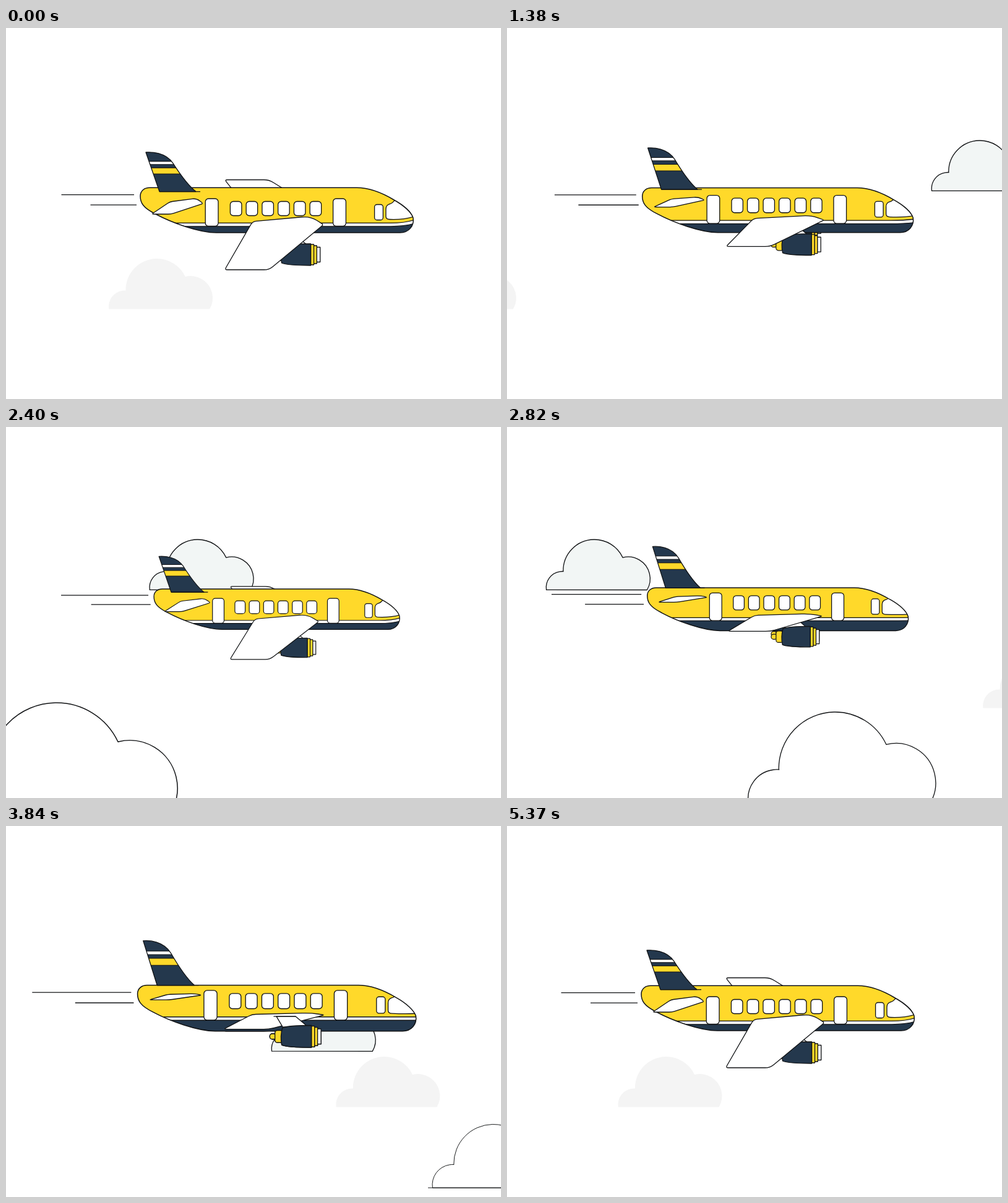
Recreate the animation shown at these times as an HTML page with a canvas. Size 800 by 600 pixels, loop 5.4 s.

```html
<!DOCTYPE html>
<html lang="en">
<head>
<meta charset="utf-8">
<title>Plane in flight</title>
<style>
  html, body { margin: 0; width: 100%; height: 100%; overflow: hidden; background: #fff; }
  canvas { display: block; width: 800px; height: 600px; }
</style>
</head>
<body>
<canvas id="stage" width="800" height="600"></canvas>
<script>
const ctx = document.getElementById('stage').getContext('2d');
const LOOP = 5400, STEP = 30;
const INK = '#101214', YELLOW = '#ffd92a', NAVY = '#24384d', WHITE = '#fff';
const CX = 437.5, CY = 295;

// Smooth monotone curve through [time, value] keys, flat at every turning point.
function curve(keys) {
  const n = keys.length;
  const slope = i => (keys[i + 1][1] - keys[i][1]) / (keys[i + 1][0] - keys[i][0]);
  const tan = keys.map((_, i) => {
    if (i === 0 || i === n - 1) return 0;
    const a = slope(i - 1), b = slope(i);
    return a * b <= 0 ? 0 : 2 * a * b / (a + b);
  });
  return t => {
    let i = 0;
    while (i < n - 2 && t > keys[i + 1][0]) i++;
    const [t0, v0] = keys[i], [t1, v1] = keys[i + 1];
    const h = t1 - t0, u = Math.min(1, Math.max(0, (t - t0) / h)), q = 1 - u;
    return v0 * (1 + 2 * u) * q * q + h * tan[i] * u * q * q +
           v1 * u * u * (3 - 2 * u) - h * tan[i + 1] * u * u * q;
  };
}

// Height of the near wing tip under the axis drives the roll.
const wingDrop = curve([[0, 96], [585, 43], [900, 66], [1200, 96], [1800, -76], [2430, 91],
  [3210, -17], [3700, 31], [4560, 39], [5145, 73], [5370, 96], [5400, 96]]);
const zoom = curve([[0, 1], [1200, 1], [1800, .95], [2400, .9], [3210, 1.02],
  [3600, 1.038], [4100, 1], [5400, 1]]);
const trailA = curve([[0, 117.5], [400, 142], [900, 131], [1800, 136.8], [2400, 156.7],
  [3210, 147.5], [4500, 167], [5130, 161], [5370, 119.5], [5400, 117.5]]);
const trailB = curve([[0, 74.5], [900, 89.5], [1800, 103.7], [2400, 106.7], [3210, 92.6],
  [4560, 93], [5370, 76], [5400, 74.5]]);
const paleX = curve([[500, 1090], [1130, 800], [1800, 497], [2400, 232], [3210, -87], [3700, -270]]);

function paint(fill, width = 1.3) {
  if (fill) { ctx.fillStyle = fill; ctx.fill(); }
  if (width) { ctx.lineWidth = width; ctx.strokeStyle = INK; ctx.stroke(); }
}

function line(x1, y1, x2, y2, width = 1.3) {
  ctx.beginPath();
  ctx.moveTo(x1, y1);
  ctx.lineTo(x2, y2);
  paint(null, width);
}

function box(x, y, w, h, r, fill) {
  ctx.beginPath();
  ctx.roundRect(x, y, w, h, r);
  paint(fill);
}

// Polygon of [x, y, cut]; each corner is softened over the length of its cut.
function softPoly(pts, fill) {
  const n = pts.length;
  const toward = (p, q) => {
    const d = Math.hypot(q[0] - p[0], q[1] - p[1]) || 1, k = Math.min(p[2], d / 2) / d;
    return [p[0] + (q[0] - p[0]) * k, p[1] + (q[1] - p[1]) * k];
  };
  ctx.beginPath();
  pts.forEach((p, i) => {
    ctx.lineTo(...toward(p, pts[(i + n - 1) % n]));
    ctx.quadraticCurveTo(p[0], p[1], ...toward(p, pts[(i + 1) % n]));
  });
  ctx.closePath();
  paint(fill);
}

function cloud(x, y, k, fill, width, overhang) {
  if (x > 820 || x + 190 * k < -10) return;
  ctx.save();
  ctx.translate(x, y);
  ctx.scale(k, k);
  ctx.beginPath();
  ctx.arc(26, 77.5, 26, Math.PI - .15, -Math.PI / 2 + .07);
  ctx.arc(78, 50.5, 50.5, Math.PI - .02, -.437);
  ctx.arc(132.5, 63.5, 35.5, -1.812, .532);
  ctx.closePath();
  paint(fill, width / k);
  if (overhang) line(-5.5, 81.3, 177.5, 81.3, width / k);
  ctx.restore();
}

function bodyPath() {
  ctx.beginPath();
  ctx.moveTo(232, 258.3);
  ctx.lineTo(567, 258.3);
  ctx.bezierCurveTo(590, 258.3, 612, 269, 627, 278);
  ctx.bezierCurveTo(643, 287, 655, 298, 658, 307);
  ctx.bezierCurveTo(660, 320, 651, 331, 637, 331);
  ctx.lineTo(340, 331);
  ctx.bezierCurveTo(312, 331, 268, 315, 241, 300.5);
  ctx.bezierCurveTo(222, 291, 217, 283, 217, 272);
  ctx.bezierCurveTo(217, 263, 224, 258.3, 232, 258.3);
  ctx.closePath();
}

function engine(y) {
  ctx.save();
  ctx.translate(0, y);
  ctx.beginPath();
  ctx.moveTo(437, -31.8);
  ctx.lineTo(467.5, -31.8);
  ctx.lineTo(486, -16);
  ctx.lineTo(447, -15);
  ctx.closePath();
  paint(WHITE);
  line(432.5, -31.8, 467.5, -31.8);
  box(426.5, -4.3, 10, 8.6, 4, YELLOW);
  box(434.7, -9.7, 12, 19.4, 4, YELLOW);
  box(502, -12, 5.7, 24, 0, WHITE);
  box(497.3, -14.5, 5, 29, 0, YELLOW);
  box(492.5, -16.5, 5, 33, 0, YELLOW);
  ctx.beginPath();
  ctx.moveTo(492.5, -17.5);
  ctx.bezierCurveTo(475, -17.5, 455, -17.5, 446.5, -13.5);
  ctx.quadraticCurveTo(442.5, 0, 445.5, 13.5);
  ctx.bezierCurveTo(455, 17.5, 475, 17.5, 492.5, 17.5);
  ctx.closePath();
  paint(NAVY);
  ctx.restore();
}

function wing(tip, front, mid, back) {
  softPoly([[353.5, tip, 4], [425, tip, 8], [513, front, 3], [492, mid, 14], [398.5, back, 6]], WHITE);
}

function fin(top, base) {
  const y = f => top + f * (base - top);
  const shape = () => {
    ctx.beginPath();
    ctx.moveTo(226, y(0));
    ctx.bezierCurveTo(235, y(-.01), 258, y(0), 270, y(.28));
    ctx.bezierCurveTo(281, y(.55), 295, y(.85), 307, y(1));
    ctx.lineTo(248, y(1));
    ctx.closePath();
  };
  shape();
  paint(NAVY, 0);
  ctx.save();
  ctx.clip();
  for (const [a, b, c] of [[.23, .31, WHITE], [.395, .55, YELLOW]]) {
    ctx.beginPath();
    ctx.rect(215, y(a), 100, y(b) - y(a));
    paint(c, 1.1);
  }
  ctx.restore();
  shape();
  paint(null);
  line(248, base, 314, base);
}

function stripe(y, x, bendL, bendR, fill) {
  ctx.beginPath();
  ctx.moveTo(x, y + bendL);
  ctx.quadraticCurveTo(x + 14, y, x + 36, y);
  ctx.lineTo(622, y);
  ctx.quadraticCurveTo(645, y, 661, y + bendR);
  ctx.lineTo(680, 345);
  ctx.lineTo(200, 345);
  ctx.closePath();
  paint(fill);
}

function windshield(top, bottom, bend) {
  ctx.beginPath();
  ctx.moveTo(630, top - 8);
  ctx.quadraticCurveTo(625, top, 619, top + 1);
  ctx.quadraticCurveTo(614, top + 3, 614, top + 9);
  ctx.lineTo(614, bottom - 5);
  ctx.quadraticCurveTo(614, bottom, 620, bottom);
  ctx.quadraticCurveTo(642, bottom + 1, 661, bottom + bend);
  ctx.lineTo(690, 250);
  ctx.lineTo(630, 230);
  ctx.closePath();
  paint(WHITE);
}

function plane(t) {
  const drop = wingDrop(t), k = zoom(t);
  const roll = drop > 33 ? (drop - 33) / 63 : (drop - 33) / 109;
  // Blend of the values for rolled near, level and rolled away.
  const mix = (near, level, away) =>
    roll > 0 ? level + (near - level) * roll : level - (away - level) * roll;

  ctx.save();
  ctx.translate(CX, CY);
  ctx.scale(k, k);
  ctx.translate(-CX, -CY);

  line(207 - trailA(t), 269.6, 207, 269.6);
  line(211 - trailB(t), 286.2, 211, 286.2);

  wing(mix(245.5, 331, 400.3), mix(300, 306, 325), mix(298, 306, 318), mix(302, 306, 318));
  engine(mix(293.5, 339.5, 379.2));

  const belt = mix(315.4, 308.5, 297.1), hull = belt + 5.4;
  const bendL = mix(0, 0, 14), bendR = mix(-5.5, 0, 12);
  bodyPath();
  paint(YELLOW, 0);
  ctx.save();
  ctx.clip();
  stripe(belt, 259, bendL * 1.15, bendR, WHITE);
  stripe(hull, 265, bendL, bendR * .9, NAVY);
  windshield(mix(284, 277.5, 264), mix(309.5, 303, 292), mix(-5, 0, 13));
  ctx.restore();
  bodyPath();
  paint(null, 1.5);

  fin(mix(201, 187.8, 199.2), mix(264.6, 258.3, 258.3));

  const doorY = mix(276, 266.5, 261.3), winY = mix(280.5, 271.3, 265);
  for (const x of [322.2, 528.6]) box(x, doorY, 20.8, hull - doorY - .3, 5, WHITE);
  for (let i = 0; i < 6; i++) box(362.4 + i * 25.75, winY, 18.5, mix(23, 24.2, 21.6), 5, WHITE);
  box(595.6, mix(285.5, 276.6, 269.8), 13.8, mix(25, 26.2, 23.2), 4, WHITE);

  const tip = mix(301, 281.5, 248.3);
  softPoly([[235.5, tip, 3], [267, tip, 5], [318.5, mix(284, 274, 264.5), 3],
    [308, mix(275.5, 271.6, 271.3), 7], [265, mix(281, 272.8, 267.6), 4]], WHITE);

  const nearWing = () => wing(CY + drop, mix(318, 305.5, 297), mix(304.5, 302.2, 304.8), mix(313, 304.5, 299));
  const nearEngine = () => engine(mix(366.5, 339.5, 322.4));
  if (roll > 0) { nearEngine(); nearWing(); }
  else { nearWing(); nearEngine(); }
  ctx.restore();
}

function draw(t) {
  ctx.fillStyle = WHITE;
  ctx.fillRect(0, 0, 800, 600);
  ctx.lineJoin = 'round';

  const grayX = 166 - .2313 * t;
  cloud(grayX, 373, 1, '#f4f4f4', 0);
  cloud(grayX + 1255.5, 373, 1, '#f4f4f4', 0);
  cloud(paleX(t), 182, 1, '#f2f6f5', 1.3);
  cloud(750.5 - .51 * (t - 3210), 282.8, 1, '#f2f6f5', 1.3);

  cloud(25.5 - 1.14 * (t - 900), 461, 1.805, WHITE, 1.3);
  cloud(733 - 1.3675 * (t - 1800), 446, 2.17, WHITE, 1.5);
  cloud(-55 - 1.14 * (t - 3210), 461, 1.805, WHITE, 1.3);
  cloud(113 - .8 * (t - 4560), 482.5, 1.262, WHITE, .95, true);

  plane(t);
}

const start = performance.now();
function tick() {
  const t = (performance.now() - start) % LOOP;
  draw(Math.floor(t / STEP) * STEP);
  requestAnimationFrame(tick);
}
tick();
</script>
</body>
</html>
```
